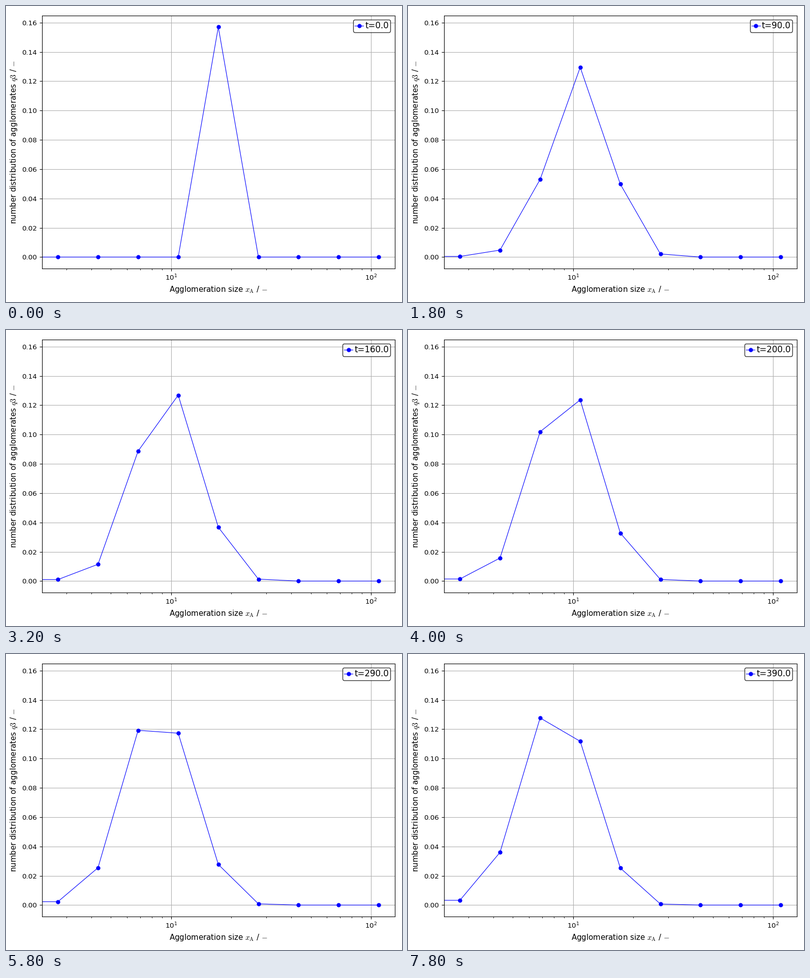
Write a matplotlib script that moves like this. It is 779 px wide and 584 px high and loops after 8000 ms.

```python
import numpy as np
import matplotlib.pyplot as plt
from matplotlib.animation import FuncAnimation

W, H, DPI = 779, 584, 100
FRAMES, INTERVAL, DT = 40, 200, 10.0
PEAK = 0.157

plt.rcParams.update({
    "font.family": "DejaVu Sans",
    "xtick.labelsize": 9.6,
    "ytick.labelsize": 9.6,
    "axes.labelsize": 10.8,
    "legend.fontsize": 12,
    "mathtext.fontset": "cm",
})

# Volume grows fourfold per class; START is the class that is full at t = 0.
RATIO = 4 ** (1 / 3)
CLASSES, START = 9, 4
steps = np.arange(CLASSES) - START
sizes = np.append(0.0, 17.23 * RATIO ** steps)


def fractions(t):
    """Volume fraction per class: breakage feeds the smaller classes,
    agglomeration one larger class, and the total stays 1."""
    slow = np.exp(-0.0088 * t)
    start = 0.15 + 0.34 * slow + 0.51 * np.exp(-0.0407 * t)
    small = 0.338 - 0.469 * slow + 0.131 * np.exp(-0.0306 * t)
    finer = small * np.hypot(0.04, 0.000443 * t)
    finest = 0.057 * finer
    rest = 1 - start - small - finer - finest
    gain = 0.117 * start * (1 - np.exp(-t / 12))
    large = gain * (start + rest / 2) / (1 + gain / 2)
    return np.array([finest, finer, small, rest - large, start, large, 0, 0, 0])


def density(t):
    q = PEAK * fractions(t) * RATIO ** -steps
    return np.append(q[0], q)


fig = plt.figure(figsize=(W / DPI, H / DPI), dpi=DPI, facecolor="white")
left, right, top, bottom = 70.55, 764.75, 18.77, 518.05
ax = fig.add_axes([left / W, 1 - bottom / H, (right - left) / W, (bottom - top) / H])

line, = ax.plot(sizes, density(0), "o-", color="blue", lw=0.8, ms=5, label="t=0.0")
ax.set_xscale("log", nonpositive="clip")
pad = (sizes[-1] / sizes[1]) ** 0.05
ax.set_xlim(sizes[1] / pad, sizes[-1] * pad)
ax.set_ylim(-0.05 * PEAK, 1.05 * PEAK)
ax.set_yticks(np.arange(9) * 0.02)
ax.grid(True)
ax.set_xlabel(r"Agglomeration size $x_{\mathrm{A}}$ / $-$")
ax.set_ylabel(r"number distribution of agglomerates $q3$ / $-$")

legend = ax.legend(loc="upper right", edgecolor="black", borderpad=0.2,
                   handlelength=1.0, handletextpad=0.2)
label = legend.get_texts()[0]


def update(frame):
    t = frame * DT
    line.set_ydata(density(t))
    label.set_text(f"t={t:.1f}")
    return line, label


anim = FuncAnimation(fig, update, frames=FRAMES, interval=INTERVAL,
                     repeat=True, repeat_delay=0, blit=False)
plt.show()
```
